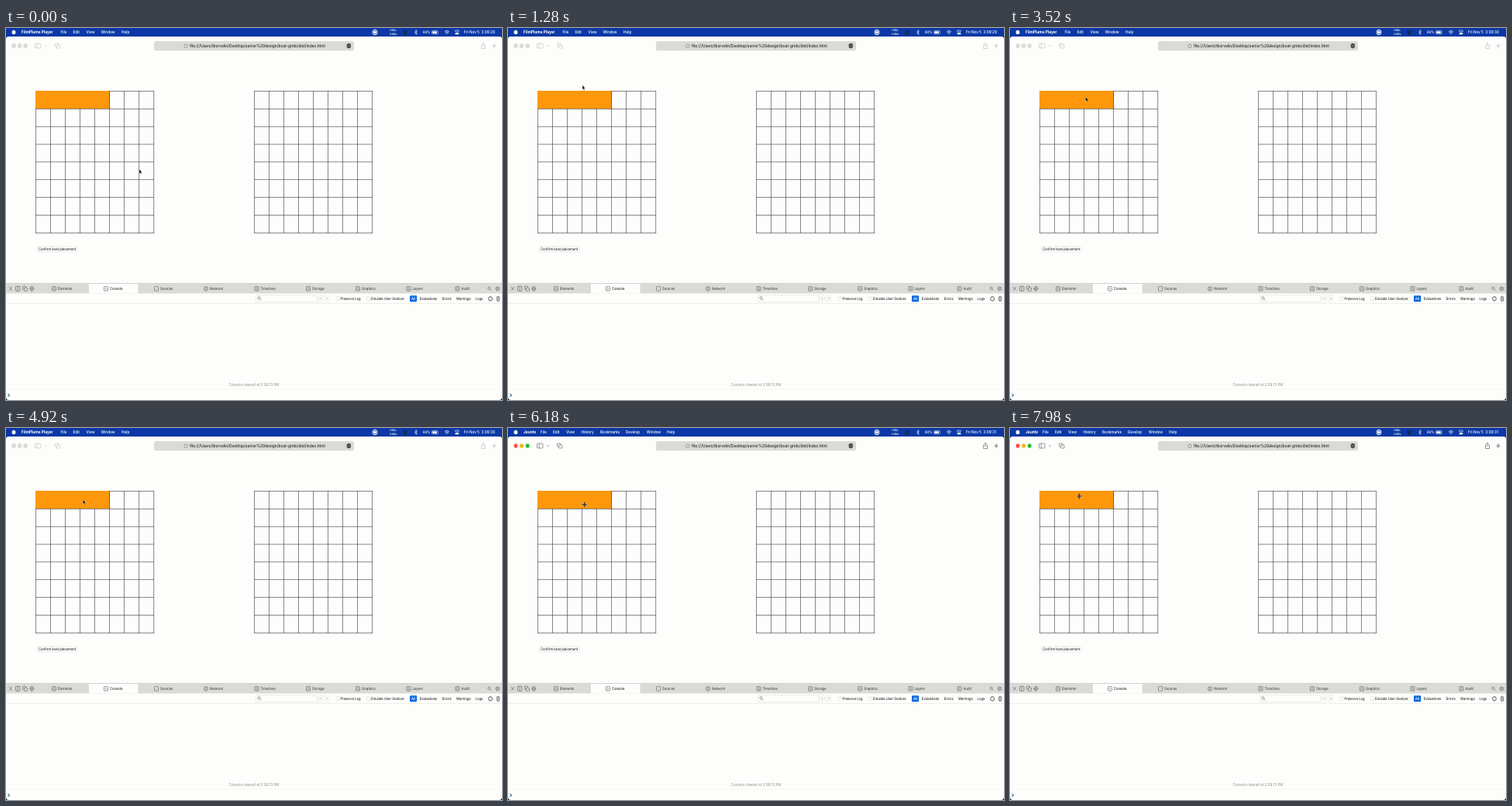
An HTML page with a canvas for the animation above (8 s loop, 640x480 px).

```html
<!DOCTYPE html>
<html lang="en">
<head>
<meta charset="utf-8">
<title>Boat grids</title>
<style>
html, body { margin: 0; width: 100%; height: 100%; overflow: hidden; background: #fdfdfc; }
canvas { display: block; width: 640px; height: 480px; }
</style>
</head>
<body>
<canvas id="stage" width="640" height="480"></canvas>
<script>
const ctx = document.getElementById('stage').getContext('2d');
const LOOP = 8000, SWITCH = 5200;
const SQUEEZE = 5 / 6; // the 16:10 desktop is shown at 4:3
const FONT = 'Inter, Roboto, sans-serif';
const PAPER = '#fdfdfc', BAR = '#dadad7', INK = '#2b2b2b', GRAY = '#6a6a68';
const SOFT = '#c2c2bf', PALE = '#ecece6';

// time, x, y of the pointer
const PATH = [
  [0, 172, 182], [300, 158, 156], [820, 112, 94], [1280, 96, 73.5], [1600, 96, 76],
  [2300, 97, 87], [3520, 97.6, 88.7], [4180, 98.3, 90], [4920, 99.3, 92.3],
  [5200, 100, 97], [5580, 101.6, 109.3], [5900, 101, 106], [6400, 97, 93],
  [6880, 93.6, 86.4], [7400, 91, 87], [7980, 89.3, 88]
];
const RING = [5150, 5900];
const TICKS = [[0, 28], [60, 29], [3000, 30], [5950, 31]];

ctx.textRendering = 'geometricPrecision';

function text(str, x, y, size = 5, color = INK, weight = 400, align = 'left') {
  ctx.save();
  ctx.translate(x, y);
  ctx.scale(SQUEEZE, 1);
  ctx.font = `${weight} ${size}px ${FONT}`;
  ctx.textAlign = align;
  ctx.textBaseline = 'middle';
  ctx.fillStyle = color;
  ctx.fillText(str, 0, 0);
  ctx.restore();
}

function rect(x, y, w, h, color) {
  ctx.fillStyle = color;
  ctx.fillRect(x, y, w, h);
}

function paint(fill, stroke, width) {
  if (fill) { ctx.fillStyle = fill; ctx.fill(); }
  if (stroke) { ctx.strokeStyle = stroke; ctx.lineWidth = width; ctx.stroke(); }
}

function round(x, y, w, h, r, fill, stroke, width = 0.7) {
  ctx.beginPath();
  ctx.roundRect(x, y, w, h, r);
  paint(fill, stroke, width);
}

function oval(x, y, r, fill, stroke, width = 0.7) {
  ctx.beginPath();
  ctx.ellipse(x, y, r * 0.88, r, 0, 0, Math.PI * 2);
  paint(fill, stroke, width);
}

function draw(d, x, y, fill, stroke, width = 0.7) {
  const path = new Path2D(d);
  ctx.save();
  ctx.translate(x, y);
  if (fill) { ctx.fillStyle = fill; ctx.fill(path); }
  if (stroke) { ctx.strokeStyle = stroke; ctx.lineWidth = width; ctx.stroke(path); }
  ctx.restore();
}

function magnifier(x, y, color) {
  oval(x - 0.6, y - 0.6, 1.7, null, color);
  draw('M.6 .7L2.2 2.4', x, y, null, color);
}

function menuBar(t, active) {
  const blue = '#0b38a6';
  rect(0, 0, 640, 11, blue);
  draw('M0 0H3Q0 0 0 3.5Z', 0, 11, blue);
  draw('M0 0H-3Q0 0 0 3.5Z', 640, 11, blue);
  oval(10, 5.5, 2.8, '#f4f6fa');

  const items = active
    ? [['File', 42], ['Edit', 58], ['View', 75], ['History', 94.5], ['Bookmarks', 119], ['Develop', 152], ['Window', 179], ['Help', 205]]
    : [['File', 70.5], ['Edit', 86.5], ['View', 103.5], ['Window', 122.5], ['Help', 149]];
  text(active ? 'Jaunto' : 'FilmPlume Player', 20, 5.5, 5.8, '#fff', 700);
  for (const [label, x] of items) text(label, x, 5.5, 5.6, '#fff', 500);

  oval(476, 5.5, 3.4, null, '#fff', 1);
  oval(476, 5.5, 2.1, '#fff');
  text('1 KB/s', 495, 3.3, 3.5, '#fff', 600);
  text('4 KB/s', 495, 7.8, 3.5, '#fff', 600);
  round(512.5, 3, 5, 6, 1, '#102d5e');
  draw('M-1.6 -1.5L1.5 1.6L0 3V-3L1.5 -1.6L-1.6 1.5', 529, 5.5, null, '#fff', 0.6);
  text('84%', 538, 5.5, 5, '#fff', 500);
  round(549.5, 3.4, 8, 4.4, 1, null, '#d6dfed', 0.6);
  rect(550.4, 4.3, 5.5, 2.6, '#fff');
  draw('M-3 -.8Q0 -4 3 -.8M-1.8 .5Q0 -1.5 1.8 .5M-.4 1.8H.4', 569, 6, null, '#fff', 0.9);
  round(579.5, 2.9, 5, 2, 1, null, '#fff', 0.6);
  round(579.5, 6.2, 5, 2, 1, '#fff');

  const second = TICKS.filter(([start]) => start <= t).pop()[1];
  text(`Fri Nov 5  3:09:${second}`, 591, 5.5, 5.6, '#fff', 500);
}

function toolbar(active) {
  const tint = active ? GRAY : SOFT;
  const lights = active ? ['#ff4d45', '#f6b51e', '#23bd37'] : Array(3).fill('#dcdcda');
  lights.forEach((color, i) => oval(10 + i * 7.6, 23, 2.8, color, active ? null : '#cececa', 0.5));

  round(37.5, 20, 7.5, 6, 1, null, tint);
  draw('M2.7 0V6', 37.5, 20, null, tint);
  draw('M-1.4 -.6L0 .8L1.4 -.6', 51.3, 23, null, tint);
  round(63.5, 20, 4.5, 4, 0.7, null, tint);
  round(65.5, 22, 4.5, 4, 0.7, PAPER, tint);

  round(191, 17, 258, 12.3, 2.5, BAR);
  oval(232, 23.2, 2.4, null, '#717170', 0.6);
  text('file:///Users/tkorvelin/Desktop/senior%20design/boat-grids/dist/index.html', 237, 23.4, 5.8, INK, 500);
  oval(442.3, 23, 3.2, '#4b4b4a');
  for (const dx of [-1.3, 0, 1.3]) oval(442.3 + dx, 23, 0.45, BAR);

  draw('M-1 -1H-2.5V3.5H2.5V-1H1M0 1V-4M-1.5 -2.5L0 -4L1.5 -2.5', 616, 23, null, tint);
  draw('M-2.6 0H2.6M0 -3V3', 630, 23, null, tint, 0.9);
}

// Hairlines fall between pixels and soften by themselves.
function grid(left) {
  const top = 81.15, wide = 19.05, high = 22.86, line = 0.6, color = '#38383c';
  for (let i = 0; i <= 8; i++) {
    rect(left + i * wide, top, line, 8 * high + line, color);
    rect(left, top + i * high, 8 * wide + line, line, color);
  }
}

function page() {
  grid(38.1);
  grid(320);
  rect(38, 81, 95.5, 23, '#ff970a');
  rect(133.3, 81.1, 0.6, 23, '#38383c');
  round(40.5, 282, 51.5, 7, 1.5, '#fff', '#dfdfda', 0.7);
  text('Confirm boat placement', 42, 285.6, 5, INK, 500);
}

function inspector() {
  rect(0, 329.5, 640, 13, BAR);
  rect(0, 329.3, 640, 0.8, '#c9c9c6');
  rect(107, 330, 63.5, 12.5, PAPER);
  draw('M-2 -2.4L2 2.4M2 -2.4L-2 2.4', 6, 336.3, null, GRAY);
  round(12.5, 333.3, 5.5, 6, 0.7, null, GRAY);
  draw('M2.7 0V6', 12.5, 333.3, null, GRAY);
  round(21.5, 333.2, 4, 4, 0.7, null, GRAY);
  round(23.5, 335.3, 4, 4, 0.7, BAR, GRAY);
  oval(33.3, 336.3, 2.6, null, GRAY);
  draw('M-3.2 0H3.2M0 -3.6V3.6', 33.3, 336.3, null, GRAY, 0.6);

  const tabs = [['Elements', 67], ['Console', 134], ['Sources', 199], ['Network', 263], ['Timelines', 328.5],
    ['Storage', 395], ['Graphics', 459], ['Layers', 524.5], ['Audit', 587.5]];
  tabs.forEach(([label, x], i) => {
    if (i === 3) oval(x - 5, 336.4, 2.8, null, GRAY);
    else round(x - 7.5, 333.6, 5, 5.6, 0.8, null, GRAY);
    if (i === 1) draw('M-1 -1.5L.7 0L-1 1.5', x - 5, 336.4, null, GRAY);
    else if (i !== 2) draw('M-1.5 -1H1.5M-1.5 1H1.5', x - 5, 336.4, null, GRAY, 0.6);
    text(label, x, 336.7, 5, i === 1 ? INK : '#4c4c4b', 500);
  });
  magnifier(624, 336.4, GRAY);
  oval(634.3, 336.4, 2.4, null, GRAY, 0.9);
  oval(634.3, 336.4, 0.8, GRAY);

  rect(0, 355, 640, 0.8, PALE);
  round(322.5, 344.8, 78.5, 8.7, 1, null, '#e4e4de', 0.7);
  magnifier(327, 349, GRAY);
  for (const [x, way] of [[405.5, 1], [414, -1]]) {
    round(x - 3, 345, 6, 8, 1, null, '#e4e4de', 0.6);
    draw(`M${way * 0.7} -1.8L${-way * 0.7} 0L${way * 0.7} 1.8`, x, 349, null, '#8e8e8b', 0.6);
  }
  for (const x of [426, 465.5]) round(x, 346.7, 4, 4.8, 0.8, '#fff', '#d4d4cf', 0.6);
  round(521, 345.2, 9.2, 8, 1.2, '#0869e0');
  text('All', 525.6, 349.4, 5, '#fff', 500, 'center');
  const labels = [['Preserve Log', 431.5], ['Emulate User Gesture', 471], ['Evaluations', 533.7],
    ['Errors', 562.7], ['Warnings', 581], ['Logs', 605.6]];
  for (const [label, x] of labels) text(label, x, 349.4, 4.95, INK, 500);
  oval(625, 349.3, 2.7, null, '#454544', 0.9);
  draw('M-2.2 -2.2H2.2M-.8 -3H.8M-1.7 -1.8L-1.3 3H1.3L1.7 -1.8M0 -1V2', 635, 349.3, null, '#454544');

  text('Console cleared at 3:09:13 PM', 320, 460.5, 5.4, '#8e8e8c', 400, 'center');
  rect(0, 465.5, 640, 0.8, '#f3f3ee');
  draw('M-1 -2L1 0L-1 2', 3.6, 473.8, null, '#2876a8', 1.1);
  draw('M0 0V-4Q0 0 3.5 0Z', 0, 480, '#111');
  draw('M0 0V-4Q0 0 -3.5 0Z', 640, 480, '#111');
}

function pointerAt(t) {
  const next = PATH.findIndex(([time]) => time > t);
  if (next < 0) return PATH.at(-1).slice(1);
  const [t0, x0, y0] = PATH[next - 1], [t1, x1, y1] = PATH[next];
  const k = (t - t0) / (t1 - t0);
  return [x0 + (x1 - x0) * k, y0 + (y1 - y0) * k];
}

function pointer(t, active) {
  const [x, y] = pointerAt(t);
  if (t >= RING[0] && t < RING[1]) {
    ctx.beginPath();
    ctx.ellipse(x, y, 7.3, 8.7, 0, 0, Math.PI * 2);
    paint(null, '#343434', 1.1);
  }
  if (active) {
    draw('M0 -3.2V3.2M-2.7 0H2.7', x, y, null, PAPER, 1.8);
    draw('M0 -2.8V2.8M-2.4 0H2.4', x, y, null, '#111', 1.1);
    draw('M0 -3.4L1.2 -2H-1.2ZM0 3.4L1.2 2H-1.2ZM-2.8 0L-1.6 -1.3V1.3ZM2.8 0L1.6 -1.3V1.3Z', x, y, '#111');
  } else {
    draw('M0 0V5.8L1.1 4.8L1.9 6.9L2.9 6.4L2.1 4.5H3.6Z', x, y, '#050505', '#eeeeee', 0.4);
  }
}

function render(t) {
  const active = t >= SWITCH;
  rect(0, 0, 640, 480, PAPER);
  menuBar(t, active);
  toolbar(active);
  page();
  inspector();
  pointer(t, active);
}

const start = performance.now();
function frame() {
  render((performance.now() - start) % LOOP);
  requestAnimationFrame(frame);
}
frame();
</script>
</body>
</html>
```
